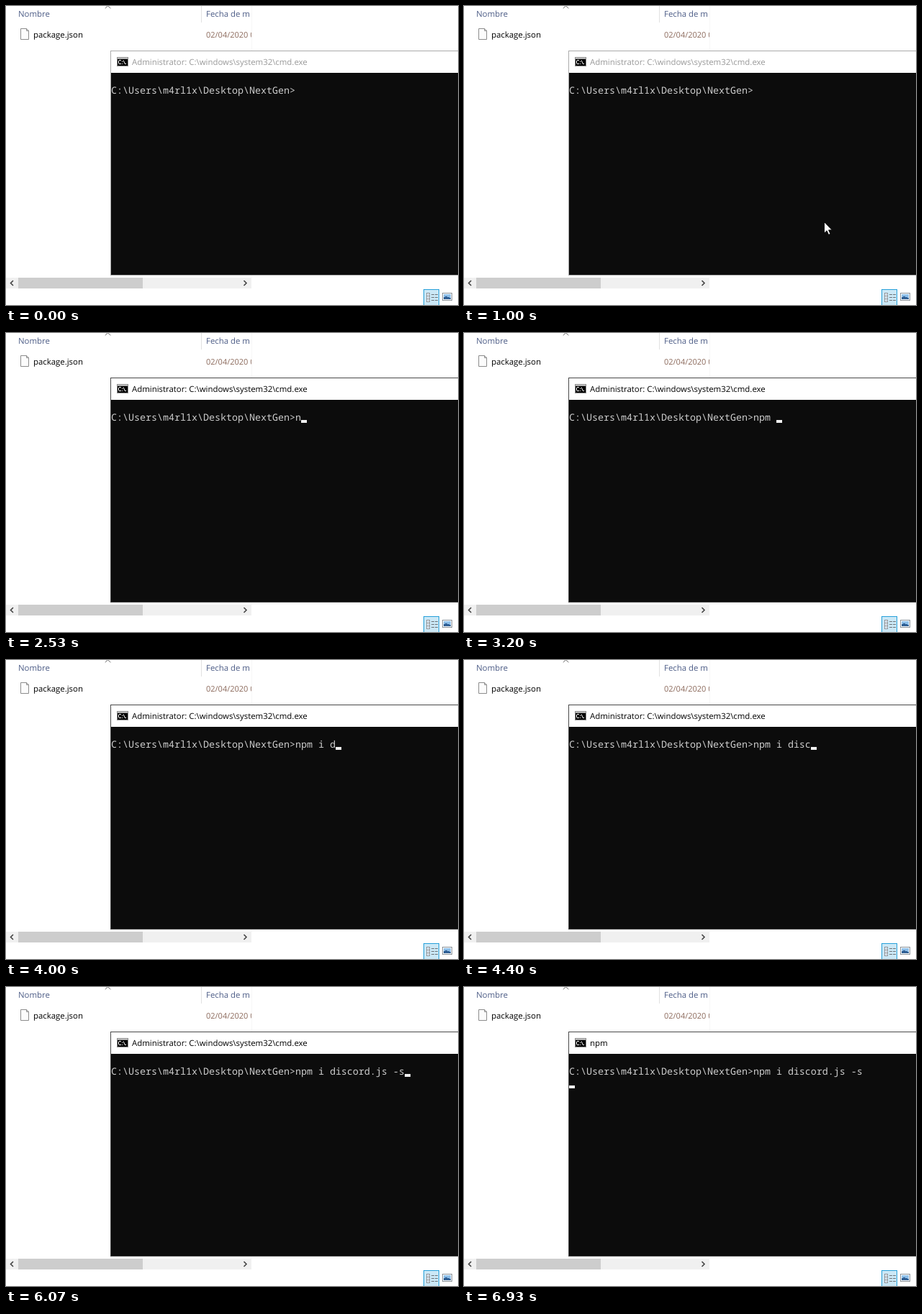
These frames come from a looping animation (628x416 px, 8000 ms). An HTML page:

```html
<!DOCTYPE html>
<html lang="es">
<head>
<meta charset="utf-8">
<title>Console</title>
<style>
  html, body { margin: 0; width: 100%; height: 100%; overflow: hidden; background: #fff; }
  svg { display: block; width: 100%; height: 100%; }
  text { white-space: pre; text-rendering: geometricPrecision; }
  .ui { font: 11.4px "Open Sans", "Noto Sans", sans-serif; }
  .mono { font: 13.333px "Noto Sans Mono", "DejaVu Sans Mono", monospace; fill: #ccc; }
  .crisp { shape-rendering: crispEdges; }
</style>
</head>
<body>
<svg viewBox="0 0 628 416">
  <defs>
    <clipPath id="pane"><rect width="341" height="416"/></clipPath>
  </defs>
  <rect width="628" height="416" fill="#fff"/>

  <!-- file list -->
  <g class="ui" clip-path="url(#pane)">
    <path d="M137.8 3.4 141.5-.3 145.2 3.4" fill="none" stroke="#666"/>
    <text x="17" y="15" fill="#4c5c86">Nombre</text>
    <text x="278" y="15" fill="#4c5c86">Fecha de m</text>
    <text x="38" y="44" fill="#000">package.json</text>
    <text x="278" y="44" fill="#8c6a5c" style="font-size:11px">02/04/2020 0</text>
  </g>
  <g class="crisp">
    <rect x="271" width="1" height="23" fill="#e2e2e2"/>
    <rect x="341" width="1" height="378" fill="#f7f7f7"/>
  </g>
  <path d="M20.5 31.5h8l3 3v12h-11z" fill="#fcfcfc" stroke="#8c8c8c"/>
  <path d="M28.5 31.5v3h3" fill="none" stroke="#8c8c8c"/>

  <!-- scroll bar -->
  <g class="crisp">
    <rect y="378" width="341" height="15" fill="#f0f0f0"/>
    <rect x="17" y="378" width="173" height="15" fill="#cdcdcd"/>
  </g>
  <path d="M10 382 6.5 385.5 10 389M330.5 382 334 385.5 330.5 389" fill="none" stroke="#444" stroke-width="1.6"/>

  <!-- view buttons -->
  <g class="crisp">
    <rect x="580.5" y="394.5" width="21" height="24" fill="#cbe8f6" stroke="#26a0da"/>
    <rect x="584" y="399" width="5" height="13" fill="#fff"/>
    <path d="M584 399.5h5M584 403.5h5M584 407.5h5M584 411.5h5M584.5 399v13M588.5 399v13" stroke="#8a9299"/>
    <path d="M586 401.5h1M586 405.5h1M586 409.5h1" stroke="#3a78b0"/>
    <path d="M591 401.5h4M596 401.5h4M591 405.5h4M596 405.5h4M591 409.5h4M596 409.5h4" stroke="#6c7379"/>
    <rect x="606.5" y="399.5" width="13" height="10" fill="#fff" stroke="#8a9299"/>
    <rect x="608" y="401" width="10" height="7" fill="#8fc0ea"/>
    <path d="M608 408v-3l3-1 3 1 4 1v2z" fill="#2f5f94"/>
  </g>

  <!-- console window -->
  <g class="crisp">
    <rect id="frame" x="145" y="62" width="483" height="313"/>
    <rect x="146" y="63" width="482" height="30" fill="#fff"/>
    <rect x="146" y="93" width="482" height="281" fill="#0c0c0c"/>
    <rect x="154" y="71" width="16" height="13" fill="#8d8d8d"/>
    <rect x="155" y="72" width="14" height="1" fill="#d8d8d8"/>
    <rect x="155" y="74" width="14" height="9" fill="#000"/>
    <path d="M157 75.5h3M156.5 76v4M157 80.5h3M161 77.5h1M161 80.5h1M166 80.5h1" stroke="#fff"/>
  </g>
  <path d="M163 75.5 165.5 81" stroke="#fff"/>
  <text id="title" class="ui" x="175" y="82"></text>
  <text id="line" class="mono" x="146" y="122"></text>
  <rect id="caret" class="crisp" width="8" height="4" fill="#f2f2f2"/>
  <path id="mouse" d="M.5.5v15.6l3.6-3.4 2.5 5.6 2.5-1.1-2.5-5.4h4.8z" fill="#fff" stroke="#000" stroke-width=".9"/>
</svg>
<script>
const LOOP = 8000;
const PROMPT = 'C:\\Users\\m4rl1x\\Desktop\\NextGen>';
const COMMAND = 'npm i discord.js -s';
const CELL = 8, LEFT = 146, CARET_TOP = 121, ROW = 16;
const FOCUS = 1130, CARET_ON = 1670, ENTER = 6800, RUN = 6930;

// one time per typed character
const KEYS = [2530, 2870, 3070, 3200, 3600, 3730, 4000, 4130, 4270, 4400,
  4530, 4730, 5000, 5130, 5400, 5470, 5730, 5870, 6070];

// pointer stops: time, x, y
const STOPS = [[1000, 500, 300], [1070, 398, 264], [1270, 430, 307], [1330, 501, 399], [1400]];

const [frame, title, line, caret, mouse] =
  ['frame', 'title', 'line', 'caret', 'mouse'].map(id => document.getElementById(id));

const show = (el, on) => el.setAttribute('visibility', on ? 'visible' : 'hidden');

function draw(t) {
  const active = t >= FOCUS;
  frame.setAttribute('fill', active ? '#484848' : '#aaa');
  title.setAttribute('fill', active ? '#000' : '#999');
  title.textContent = t < RUN ? 'Administrator: C:\\windows\\system32\\cmd.exe' : 'npm';

  const typed = KEYS.filter(k => k <= t).length;
  const text = PROMPT + COMMAND.slice(0, typed);
  line.textContent = text;

  const entered = t >= ENTER;
  show(caret, t >= CARET_ON);
  caret.setAttribute('x', LEFT + (entered ? 0 : text.length * CELL));
  caret.setAttribute('y', CARET_TOP + (entered ? ROW : 0));

  const stop = STOPS.filter(s => s[0] <= t).pop();
  const inside = !!stop && stop.length > 1;
  show(mouse, inside);
  if (inside) mouse.setAttribute('transform', `translate(${stop[1]} ${stop[2]})`);
}

const start = performance.now();
function tick() {
  draw((performance.now() - start) % LOOP);
  requestAnimationFrame(tick);
}
tick();
</script>
</body>
</html>
```
